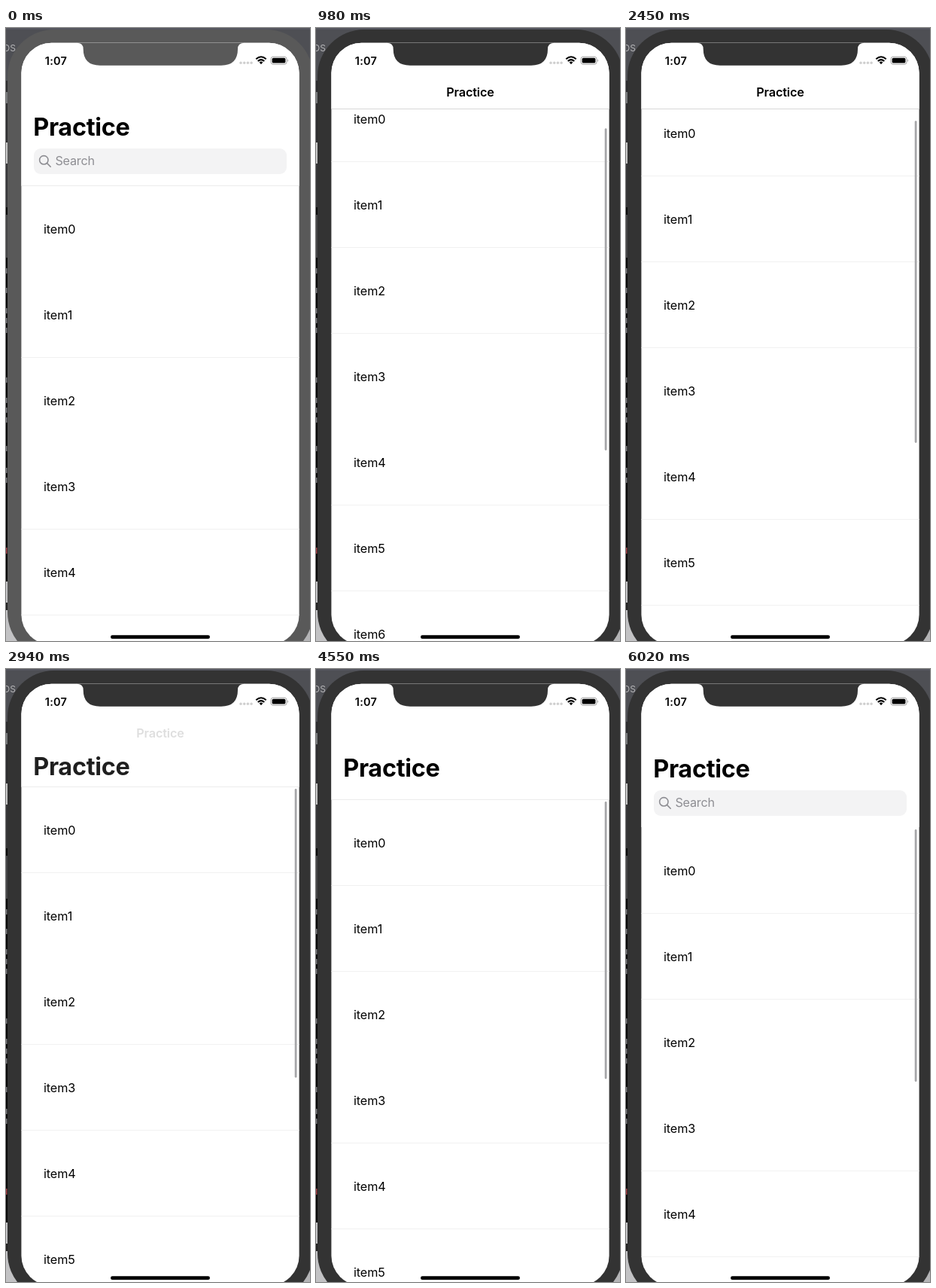
An HTML page for the animation above (6090 ms loop, 404 by 814 pixels).

```html
<!DOCTYPE html>
<html lang="en">
<head>
<meta charset="utf-8">
<title>Practice list</title>
<style>
html, body { margin: 0; width: 100%; height: 100%; overflow: hidden; background: #333; }
svg { display: block; width: 100vw; height: 100vh; }
text { font-family: Inter, "Liberation Sans", sans-serif; fill: #000; }
.item { font-size: 16.2px; letter-spacing: -.1px; }
.big { font-size: 32.4px; font-weight: 700; letter-spacing: -.28px; }
.small { font-size: 16.2px; font-weight: 600; letter-spacing: -.1px; }
.hint { font-size: 16.2px; letter-spacing: -.2px; fill: #8e8e93; }
.clock { font-size: 14.5px; font-weight: 600; letter-spacing: .25px; }
</style>
</head>
<body>
<svg viewBox="0 0 404 814">
  <defs>
    <clipPath id="screen"><rect x="20.400" y="19.700" width="369.200" height="799.300" rx="40"/></clipPath>
    <clipPath id="titleArea"><rect x="20" y="107" width="370" height="120"/></clipPath>
  </defs>
  <g id="desktop">
    <rect width="404" height="814" fill="#4e4f54"/>
    <rect width="404" height="2" fill="#55565f"/>
    <text x="-4" y="30.500" font-size="12" style="fill:#b4b4b6">OS</text>
  </g>
  <rect id="body" x="2" y="2" width="406" height="836" rx="62"/>
  <g clip-path="url(#screen)">
    <rect x="20" y="19" width="370" height="800" fill="#fff"/>
    <g id="list"></g>
    <rect id="nav" x="20" y="19" width="370" fill="#fff"/>
    <rect id="navLine" x="20" width="370" height="1"/>
    <rect id="field" x="37" width="336" fill="#f3f3f4"/>
    <g id="hint">
      <g fill="none" stroke="#8e8e93" stroke-width="1.600" stroke-linecap="round">
        <circle cx="50.300" cy="175.300" r="5.700"/>
        <path d="M54.600 179.600L59.200 184.200"/>
      </g>
      <text class="hint" x="65.400" y="182">Search</text>
    </g>
    <g clip-path="url(#titleArea)"><text id="big" class="big" x="36.200" y="142.700">Practice</text></g>
    <text id="small" class="small" x="205" y="91" text-anchor="middle">Practice</text>
    <rect id="bar" x="383.700" width="2.800" rx="1.400" fill="#a6a6a8"/>
    <text class="clock" x="51.800" y="48.500">1:07</text>
    <g id="dots" fill="#cfcfcf"></g>
    <g fill="none" stroke="#000" stroke-width="2">
      <path d="M332.300 41.200Q339 35.300 345.700 41.200"/>
      <path d="M334.700 44Q339 40.200 343.300 44"/>
    </g>
    <path d="M336.600 45.600Q339 43.600 341.400 45.600L339 48.300Z"/>
    <rect x="352" y="38.200" width="21" height="10" rx="3" fill="none" stroke="#999" stroke-width=".9"/>
    <rect x="353.600" y="39.800" width="17.800" height="6.800" rx="1.600"/>
    <path d="M374.300 41.500Q376.200 43.200 374.300 45Z" fill="#999"/>
    <path id="notch" d="M95 19V19.700Q102.700 20 102.700 28Q102.700 49.700 125 49.700H286Q308 49.700 308 28Q308 20 316 19.700V19Z"/>
    <rect x="139" y="806.300" width="132" height="4.800" rx="2.400"/>
  </g>
</svg>
<script>
const LOOP = 6090, STEP = 70, ROW = 114, ROWS = 10;
const NS = "http://www.w3.org/2000/svg";
const $ = id => document.getElementById(id);
const clamp = (v, lo, hi) => Math.min(hi, Math.max(lo, v));

function set(el, attrs) {
  for (const k in attrs) el.setAttribute(k, attrs[k]);
  return el;
}
function add(parent, tag, attrs) {
  return parent.appendChild(set(document.createElementNS(NS, tag), attrs));
}

// slivers of the desktop beside the phone: top, height, colour
[
  [70, 15, "#2c2c2e"], [85, 15, "#77797b"], [100, 52, "#2c2c2e"], [152, 28, "#c4c4c4"],
  [180, 58, "#343436"], [238, 10, "#0a0a0a"], [248, 57, "#434345"], [305, 430, "#080808"],
  [735, 79, "#c2c2c4"]
].forEach(([y, height, fill]) =>
  add($("desktop"), "rect", { x: 0, y, width: y < 735 ? 3 : 24, height, fill }));
[319, 345, 372, 385, 398, 464, 491, 504, 517, 555, 584, 597].forEach(y =>
  add($("desktop"), "rect", { x: 0, y, width: 1.500, height: 7, fill: "#77777a" }));
add($("desktop"), "rect", { x: 0, y: 690, width: 1.500, height: 8, fill: "#a04046" });
add($("desktop"), "rect", { x: 0, y: 763, width: 2, height: 10, fill: "#222" });
add($("desktop"), "rect", { x: 384, y: 735, width: 20, height: 79, fill: "#b4b4b6" });

for (let i = 0; i < 4; i++) add($("dots"), "circle", { cx: 312 + i * 4.700, cy: 46.300, r: 1.700 });

const rules = [];
for (let i = 0; i < ROWS; i++) {
  add($("list"), "text", { class: "item", x: 50, y: 272.700 + i * ROW }).textContent = "item" + i;
  rules.push(add($("list"), "rect", { x: 20, y: 323 + i * ROW, width: 370, height: 1, fill: "#f1f1f1" }));
}

// scroll offset over time
const KEYS = [
  [0, 0], [210, 18], [560, 85], [980, 146], [1330, 215], [1610, 275], [1820, 296], [1960, 288],
  [2450, 127], [2800, 72], [3150, 28], [3500, 0], [4270, 0], [4620, 48], [4900, 92],
  [5180, 65], [5530, 4], [5670, -8], [5810, -6], [6020, -1], [LOOP, -1]
];
const slope = i => (KEYS[i + 1][1] - KEYS[i][1]) / (KEYS[i + 1][0] - KEYS[i][0]);
function tangent(i) {
  if (i === 0 || i === KEYS.length - 1) return 0;
  const a = slope(i - 1), b = slope(i);
  return a * b > 0 ? 2 * a * b / (a + b) : 0;
}
function offsetAt(t) {
  let i = 0;
  while (i < KEYS.length - 2 && t >= KEYS[i + 1][0]) i++;
  const [t0, y0] = KEYS[i], [t1, y1] = KEYS[i + 1];
  const d = t1 - t0, u = (t - t0) / d, v = 1 - u;
  return y0 * (1 + 2 * u) * v * v + y1 * (3 - 2 * u) * u * u
    + d * u * v * (tangent(i) * v - tangent(i + 1) * u);
}

function draw(t) {
  const s = Math.round(offsetAt(t));
  const pull = Math.max(0, -s);
  const bottom = Math.max(107, 209 - s);
  const shade = t < STEP ? "#595959" : "#333333";
  set($("body"), { fill: shade });
  set($("notch"), { fill: shade });

  set($("list"), { transform: `translate(0 ${-s})` });
  const faint = s > 102 ? 3 : s > 40 ? 1 : 2;
  rules.forEach((r, i) => set(r, { opacity: i === faint || (s === 0 && i === 0) ? 0 : 1 }));

  set($("nav"), { height: bottom - 19 });
  set($("navLine"), { y: bottom, fill: s > 102 ? "#d8d8d8" : "#ececec", opacity: s < 0 ? 0 : 1 });

  // the search field folds first, then the large title slides away
  const fold = clamp(s, 0, 34);
  set($("field"), { y: 160 + pull, height: 34 - fold, rx: Math.min(9, (34 - fold) / 2) });
  set($("hint"), { transform: `translate(0 ${pull - fold / 2})`, opacity: clamp(1 - s / 17, 0, 1) });
  const big = clamp((67 - s) / 16, 0, 1);
  set($("big"), { y: 142.700 + pull - Math.max(0, s - 51), opacity: big });
  set($("small"), { opacity: 1 - big });

  set($("bar"), {
    y: bottom + 3 + 0.527 * Math.max(0, s - 102),
    height: 336 + 0.9 * Math.min(s, 102),
    opacity: t < STEP ? 0 : 1
  });
}

const start = performance.now();
function tick() {
  const t = (performance.now() - start) % LOOP;
  draw(Math.floor(t / STEP) * STEP);
  requestAnimationFrame(tick);
}
tick();
</script>
</body>
</html>
```
